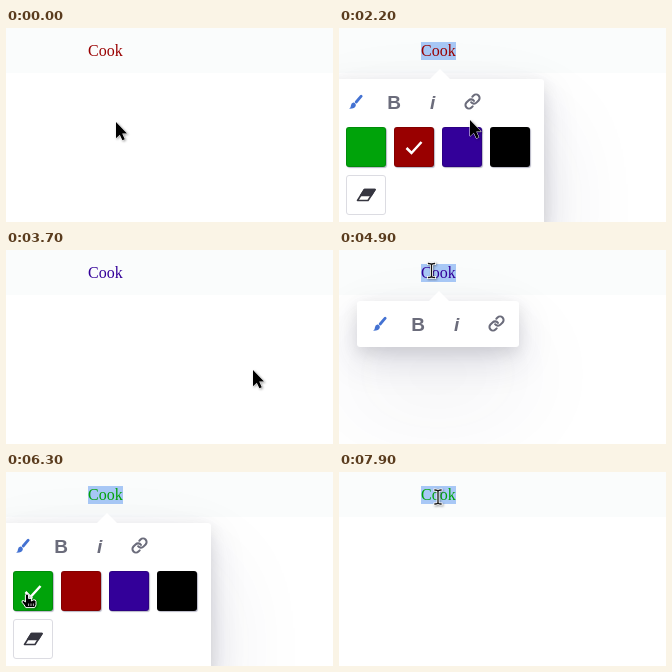
An HTML page for the animation above (8 s loop, 327 by 194 pixels).

```html
<!DOCTYPE html>
<html lang="en">
<head>
<meta charset="utf-8">
<title>Text colour toolbar</title>
<style>
  html, body { margin: 0; width: 100%; height: 100%; overflow: hidden; background: #fff; }
  #stage { position: relative; width: 327px; height: 194px; overflow: hidden; }
  #band { position: absolute; inset: 0 0 auto; height: 45px; background: #fafcfc; }
  #word {
    position: absolute; left: 82px; top: 14px;
    font: 16px/18px "Liberation Serif", Times, serif;
  }
  #word.selected { background: #a8c8f6; }
  #popup {
    position: absolute; left: 18px; top: 51px; width: 162px; height: 46px;
    border-radius: 3px; background: #fff;
    box-shadow: 0 50px 100px rgba(50, 50, 93, .1), 0 15px 35px rgba(50, 50, 93, .15), 0 5px 15px rgba(0, 0, 0, .1);
  }
  #popup.open { left: -6px; width: 211px; height: 149px; }
  #popup::before {
    content: ""; position: absolute; left: 50%; top: -10px; margin-left: -9px;
    border: solid transparent; border-width: 0 10px 10px; border-bottom-color: #fff;
  }
  #tools { position: absolute; left: 0; top: 0; }
  #tools text { font: bold 19px "Liberation Sans", Arial, sans-serif; fill: #6b6c7b; }
  #palette { display: none; }
  .open #palette { display: block; }
  .swatch {
    position: absolute; top: 48px; width: 40px; height: 40px; box-sizing: border-box;
    border: 1px solid rgba(0, 0, 0, .14); border-radius: 3px;
    box-shadow: 1px 1px 1px rgba(50, 50, 93, .35);
  }
  .swatch svg { position: absolute; left: -1px; top: -1px; }
  .erase { left: 13px; top: 96px; border-color: #dcdce2; box-shadow: none; }
  #cursor { position: absolute; left: 0; top: 0; overflow: visible; filter: drop-shadow(1px 1px 1px rgba(0, 0, 0, .35)); }
</style>
</head>
<body>
<div id="stage">
  <div id="band"></div>
  <div id="word">Cook</div>
  <div id="popup">
    <svg id="tools" width="162" height="46">
      <g fill="#4472d2">
        <path d="M28.2 17.2 23.2 23" stroke="#4472d2" stroke-width="2.8" stroke-linecap="round"/>
        <path d="M20.3 23.6q2.7.4 2.5 3-.7 3.3-6.6 3.2 1.9-1.4 1.7-3.2.3-2.6 2.4-3z"/>
      </g>
      <text x="54.3" y="29.5">B</text>
      <text x="97" y="29.5" font-style="italic" style="font-style:italic">i</text>
      <g transform="translate(131 14) scale(.71)" fill="none" stroke="#6b6c7b" stroke-width="2.9" stroke-linecap="round">
        <path d="M10 13a5 5 0 0 0 7.54.54l3-3a5 5 0 0 0-7.07-7.07l-1.72 1.71"/>
        <path d="M14 11a5 5 0 0 0-7.54-.54l-3 3a5 5 0 0 0 7.07 7.07l1.71-1.71"/>
      </g>
    </svg>
    <div id="palette">
      <div class="swatch erase">
        <svg width="40" height="40" stroke="#363640" stroke-width="1.6" stroke-linejoin="round">
          <path d="M18.5 14.5H29L22 25.5H11.5z" fill="#fff"/>
          <path d="M18.5 14.5H29L25.2 20.5H14.7z" fill="#363640"/>
        </svg>
      </div>
    </div>
  </div>
  <svg id="cursor" width="1" height="1">
    <path data-kind="arrow" d="M0 0V16.2L3.8 12.7 6.4 18.3 8.8 17.2 6.2 11.6H11Z" stroke="#fff" stroke-width="1" paint-order="stroke"/>
    <g data-kind="beam" fill="none" stroke-linecap="square">
      <path d="M-3-7Q0-7 0-5.5Q0-7 3-7M0-5.5V5.5M-3 7Q0 7 0 5.5Q0 7 3 7" stroke="#fff" stroke-width="3"/>
      <path d="M-3-7Q0-7 0-5.5Q0-7 3-7M0-5.5V5.5M-3 7Q0 7 0 5.5Q0 7 3 7" stroke="#111" stroke-width="1.3"/>
    </g>
    <g data-kind="hand" stroke="#fff" stroke-linejoin="round">
      <path d="M-1.6.8Q0-1 1.6.8V4.6Q3.3 3.5 4.3 5.1 6-.1 4.3 7 5.2 6.9 6.1 5.9 8.9 5.2 9 7.4V10.6Q8.8 12 7.6 13.6H-1.2Q-2.5 11-5 8.2-5.3 5.9-3.2 6.6L-1.6 8Z" fill="#000" stroke-width="1"/>
      <path d="M1.6 9.5V12M4 9.5V12M6.4 9.5V12" stroke-width=".7"/>
    </g>
  </svg>
</div>
<script>
const LOOP = 8000, STEP = 100;
const RED = "#990000", BLUE = "#330099", GREEN = "#00a30a";
const $ = id => document.getElementById(id);

// Cursor moves: first step, number of steps, x, y, shape on arrival
const moves = [
  [0, 1, 110, 94, "arrow"],
  [1, 2, 107, 77, "arrow"],
  [4, 1, 111, 31, "beam"],
  [6, 4, 97, 17, "beam"],
  [12, 2, 68, 38, "arrow"],
  [14, 1, 59, 54, "arrow"],
  [15, 1, 40, 70, "hand"],
  [16, 1, 28, 74, "hand"],
  [20, 3, 131, 92, "arrow"],
  [23, 2, 172, 106, "hand"],
  [26, 3, 122, 117, "hand"],
  [32, 5, 247, 120, "arrow"],
  [41, 3, 87, 10, "arrow"],
  [46, 1, 102, 22, "beam"],
  [48, 1, 92.5, 20.5, "beam"],
  [51, 2, 72, 55, "arrow"],
  [54, 1, 30, 72, "hand"],
  [59, 2, 21, 122, "hand"],
  [66, 4, 246, 122, "arrow"],
  [71, 1, 252, 122, "arrow"],
  [73, 5, 99, 25, "beam"]
];

// Values that hold from the given step on
const colors = [[0, RED], [29, BLUE], [63, GREEN]];
const selection = [[0, false], [6, true], [37, false], [48, true], [71, false], [79, true]];
const popups = [[0, ""], [7, "small"], [17, "open"], [37, ""], [49, "small"], [56, "open"], [71, ""]];
const valueAt = (track, step) => track.filter(([from]) => from <= step).pop()[1];

function cursorAt(step) {
  const i = moves.filter(m => m[0] <= step).length - 1;
  const [from, count, x, y, kind] = moves[i];
  const p = Math.min(1, (step - from + 1) / count);
  if (p === 1) return { x, y, kind };
  const [, , px, py, prevKind] = moves[i - 1];
  const mid = kind === "beam" && prevKind === "beam" ? "beam" : "arrow";
  return { x: px + (x - px) * p, y: py + (y - py) * p, kind: mid };
}

const swatches = [GREEN, RED, BLUE, "#000000"].map((color, i) => {
  const el = document.createElement("div");
  el.className = "swatch";
  el.style.cssText = `left:${13 + 48 * i}px;background-color:${color}`;
  el.innerHTML = '<svg width="40" height="40"><path d="M12.5 21 17.5 26 27.5 15" fill="none" stroke="#fff" stroke-width="2.5"/></svg>';
  $("palette").append(el);
  return { color, check: el.firstChild };
});
const shapes = [...$("cursor").children];

function draw(step) {
  const color = valueAt(colors, step), popup = valueAt(popups, step);
  $("word").style.color = color;
  $("word").className = valueAt(selection, step) ? "selected" : "";
  $("popup").className = popup;
  $("popup").style.display = popup ? "block" : "none";
  for (const s of swatches) s.check.style.display = s.color === color ? "block" : "none";
  const { x, y, kind } = cursorAt(step);
  $("cursor").style.transform = `translate(${x}px, ${y}px)`;
  for (const s of shapes) s.style.display = s.dataset.kind === kind ? "inline" : "none";
}

const start = performance.now();
function tick() {
  draw(Math.floor((performance.now() - start) % LOOP / STEP));
  requestAnimationFrame(tick);
}
tick();
</script>
</body>
</html>
```
